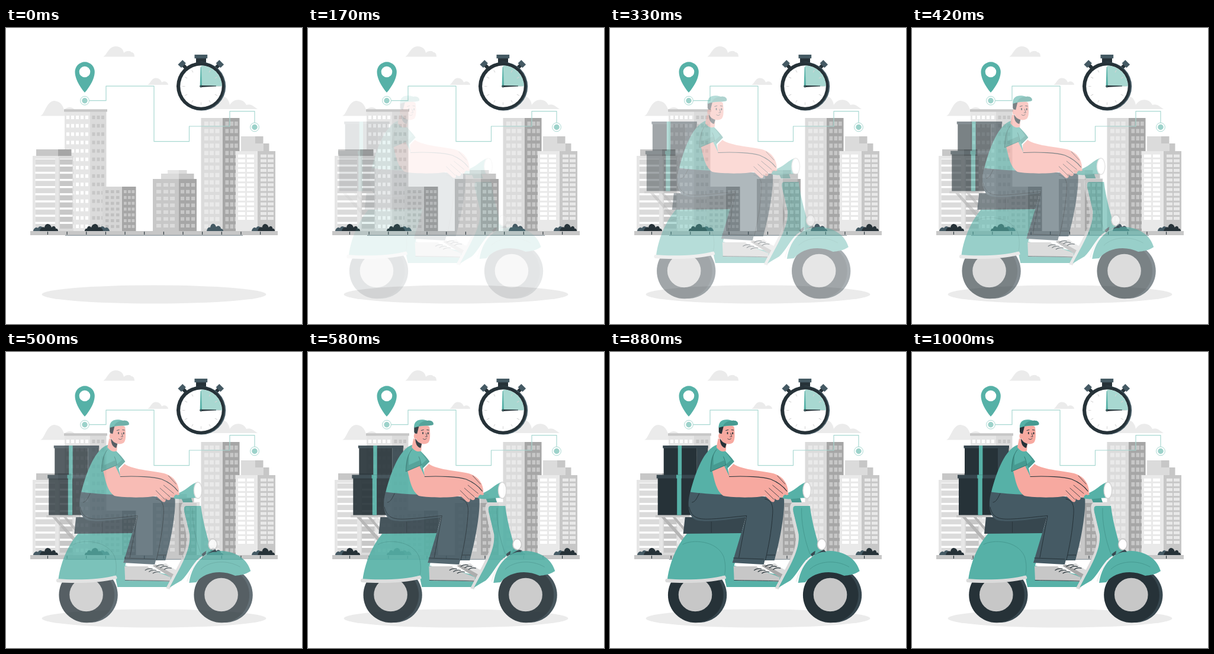
Recreate the animation shown at these times as an HTML page. Size 500x500 px, loop 1.04 s.

```html
<!DOCTYPE html>
<html lang="en">
<head>
<meta charset="utf-8">
<title>Delivery scooter</title>
<style>
html, body { margin: 0; width: 100%; height: 100%; overflow: hidden; background: #fff; }
svg { display: block; width: 100vw; height: 100vh; }
</style>
</head>
<body>
<svg viewBox="0 0 500 500">
  <g id="city"></g>
  <g id="rider"></g>
</svg>
<script>
const TEAL = '#56b1a7', DEEP = '#469a91', PALE = '#a8d8d1', INK = '#263238', SLATE = '#455a64',
      STEEL = '#37474f', SKIN = '#f7a9a0', CLOUD = '#ebebeb';

const rect = (x, y, w, h, fill) => `<rect x="${x}" y="${y}" width="${w}" height="${h}" fill="${fill}"/>`;
const oval = (x, y, rx, ry, fill, extra = '') =>
  `<ellipse cx="${x}" cy="${y}" rx="${rx}" ry="${ry}" fill="${fill}" ${extra}/>`;
const disc = (x, y, r, fill, extra) => oval(x, y, r, r, fill, extra);
const shape = (d, fill) => `<path d="${d}" fill="${fill}"/>`;
const line = (d, color = INK, width = 1) =>
  `<path d="${d}" fill="none" stroke="${color}" stroke-width="${width}" stroke-linecap="round" stroke-linejoin="round"/>`;
const repeat = (n, fn) => Array.from({ length: n }, (_, i) => fn(i)).join('');

// Window grid: columns at xs, n rows starting at y.
const windows = (xs, w, y, step, h, n, fill) =>
  xs.map(x => repeat(n, i => rect(x, +(y + i * step).toFixed(1), w, h, fill))).join('');

function clouds() {
  return shape('M164 48.5C171 46 173 31 185 31C194 31 198 36 199 42C204 38 209 38 212 41C216 41 217 45 217 48.5Z', CLOUD)
    + shape('M239 96C244 94 246 84 253 84.5C259 85 262 88 263 92C267 88 274 91 274 96Z', CLOUD)
    + shape('M58 148.5C66 146 68 123 82 123C92 124 96 131 98 138C106 131 115 134 118 141L126 148.5Z', CLOUD)
    + shape('M338 137C348 133 352 114 363 114.5C373 115 377 123 378 130C384 119 400 118 406 130C414 127 420 134 425 137Z', CLOUD);
}

function buildings() {
  const tower = rect(99, 141, 43, 202, '#e6e6e6') + rect(142, 141, 27.5, 202, '#dbdbdb')
    + rect(98, 137.3, 73, 4.2, '#c7c7c7')
    + windows([102, 110, 118, 126, 134], 5, 148, 14.15, 6, 14, '#fff')
    + windows([145.5, 153.5, 161], 5, 148, 14.15, 6, 14, '#c7c7c7');
  const office = rect(51, 205, 37, 12, '#c7c7c7') + rect(88, 205, 22.5, 12, '#a6a6a6')
    + rect(45, 216, 43.5, 127, '#e6e6e6') + rect(88.5, 216, 25.5, 127, '#dbdbdb')
    + rect(49.5, 221, 33.5, 119, '#fff') + rect(91, 221, 21.5, 119, '#fff')
    + windows([49.5], 33.5, 222, 12.1, 8.7, 10, '#dbdbdb')
    + windows([91], 21.5, 222, 12.1, 8.7, 10, '#c7c7c7');
  const block = rect(163, 268, 33, 75, '#d6d6d6') + rect(196, 268, 23.5, 75, '#a6a6a6')
    + windows([168, 177, 186], 5.5, 274, 9.8, 5, 7, '#c0c0c0')
    + windows([199, 206, 212.5], 4.7, 274, 9.8, 5, 7, '#c7c7c7');
  const stepped = rect(273, 240, 19, 6, '#e6e6e6') + rect(292, 240, 13.5, 6, '#dbdbdb')
    + rect(262, 246, 30, 9, '#dbdbdb') + rect(292, 246, 25.5, 9, '#c7c7c7')
    + rect(248, 255, 44, 88, '#c7c7c7') + rect(292, 255, 30, 88, '#a6a6a6')
    + windows([254, 266, 277], 8, 262, 11.5, 6, 7, '#dbdbdb')
    + windows([295, 304, 313], 6.2, 262, 11.5, 6, 7, '#c7c7c7');
  const high = rect(329.5, 152, 36.5, 191, '#dbdbdb') + rect(366, 152, 28.5, 191, '#a6a6a6')
    + windows([335, 344, 353.5], 7, 158, 12.4, 7.2, 15, '#e9e9e9')
    + windows([370.5, 378.5, 386], 5.7, 158, 12.4, 7.2, 15, '#c7c7c7');
  const right = rect(397, 183, 23.5, 26, '#dbdbdb') + rect(420.5, 183, 14, 26, '#c7c7c7')
    + rect(421, 195, 14, 14, '#dbdbdb') + rect(435, 195, 9.5, 14, '#c7c7c7')
    + rect(388, 208, 37, 135, '#e9e9e9') + rect(425, 208, 30, 135, '#c7c7c7')
    + windows([392, 407], 12, 213.7, 8.1, 5, 14, '#fff')
    + windows([430, 442], 10, 213.7, 8.1, 5, 14, '#e9e9e9');
  return tower + office + block + stepped + high + right;
}

function street() {
  const bush = (x, w, flip) => `<g transform="translate(${flip ? x + w : x} 343) scale(${(flip ? -w : w) / 42} 1)">`
    + shape('M0 0C1 -6 6 -7 8 -5C10 -9 15 -9 17 -4L20 0Z', SLATE)
    + shape('M11 0C12 -6 17 -8 19 -6C20 -14 29 -14 31 -6C34 -10 38 -8 38 -4C41 -5 42 -2 42 0Z', INK) + '</g>';
  return rect(41, 343, 418, 7, '#c7c7c7') + rect(100, 349.8, 300, 0.9, '#687982')
    + bush(46, 42) + bush(133, 42, true) + bush(415, 39)
    + shape('M339 343C340 337 343 336 345 337C346 329 353 329 355 336C359 332 363 336 363 339C366 339 367 341 367 343Z', SLATE)
    + repeat(12, i => rect(69.9 + i * 32.65, 344, 1.1, 5, INK));
}

function route() {
  const stop = (x, y) => disc(x, y, 7.4, '#fff', `stroke="${PALE}"`) + disc(x, y, 4.7, '#9cd2ca');
  return line('M140.5 122.7H169V98.2H250V191.7H309.5V166H378V140.6H420V160', PALE, 1.2)
    + stop(133, 122.7) + stop(420, 167.5)
    + shape('M133 109C130 106 116.5 89 116.5 74A16.6 16.6 0 0 1 149.8 74C149.8 89 136 106 133 109Z', TEAL)
    + disc(133, 74, 9.3, '#fff');
}

function stopwatch() {
  const knob = (x, turn) => `<g transform="translate(${x} 61) rotate(${turn})">`
    + rect(-3, 2, 6, 8, INK) + rect(-5.5, -4.5, 11, 8, SLATE) + '</g>';
  return knob(297.5, -45) + knob(361, 45)
    + rect(321, 50, 17, 10, INK) + rect(318.5, 45, 21.7, 6.3, SLATE)
    + disc(330.2, 98.6, 41, SLATE) + disc(328.6, 98.3, 40.6, INK) + disc(329.5, 98.5, 35.3, '#fff')
    + shape('M329.5 98.5V63.2A35.3 35.3 0 0 1 364.8 98.5Z', PALE)
    + repeat(12, i => `<path d="M329.5 67V71.5" stroke="#d5d5d5" transform="rotate(${i * 30} 329.5 98.5)"/>`)
    + shape('M328.6 66H329.8L331 99H327.6Z', TEAL) + shape('M328 97L355 97.6V98.6L328 100Z', INK)
    + disc(329.3, 98.4, 2, INK) + disc(329.3, 98.4, 0.8, TEAL);
}

function wheel(x) {
  return oval(x + 5.5, 410.5, 47, 46.5, STEEL) + disc(x, 410.5, 46.8, INK) + disc(x - 0.7, 410, 28.3, '#c7c7c7');
}

function cargo() {
  return shape('M84 278H90L129 320H121Z M103 278H108L128 301V308Z', '#b5b5b5')
    + rect(75, 275.5, 58, 3.8, '#c7c7c7')
    + rect(89, 160, 56, 48, INK) + rect(145, 160, 18.5, 48, STEEL)
    + rect(87.5, 158, 76.5, 4.5, STEEL) + rect(113, 158, 6.4, 50, TEAL)
    + rect(79, 211, 80, 64.5, INK) + rect(77, 207.5, 82, 6, STEEL) + rect(111.5, 213, 7.3, 62.5, TEAL)
    + rect(110.3, 207.5, 9, 6, TEAL);
}

function scooter() {
  const rear = shape('M129 306C116 321 100 348 95 385C132 387 164 386 191 378L195 397H282L290 378L208 361L224 300Z', TEAL)
    + line('M121 325C137 316 178 318 190 345C193 354 194 365 192 376', DEEP)
    + shape('M93 383C126 386 168 384 192 377.5Q195 380 194 383C164 391 122 391 93 389Q90 386 93 383Z', '#dbdbdb')
    + shape('M125 279H228L220 306L122 307Z', STEEL) + line('M169.5 287V305', INK, 0.8);
  const fender = shape('M316 390C322 352 346 336 370 336C398 337 415 352 420 370C411 376 402 377 394 378C372 367 342 371 328 389Z', TEAL)
    + line('M336 367C350 353 380 350 402 363', DEEP);
  const shield = shape('M334 253.5V260H312Q307 261 308 270L317 306C320 335 306 358 283 401L277 399C298 359 314 336 312 312L303 270C301 260 303 254 309 253.5Z', '#dbdbdb')
    + shape('M311 260H336C339 285 345 305 349 320V340L333 348C322 358 314 376 303 386Q294 391 283 398C304 358 319 334 317 308L308 270Q306 260 311 260Z', TEAL)
    + line('M322 264C321 285 326 315 336 341', DEEP) + line('M338 346C326 355 318 369 313 387', '#f0f0f0', 2.2)
    + shape('M337 342C345 334 352 333 360 334L363 338C354 337 346 339 340 345Z', STEEL)
    + shape('M344 342C346 328 351 320 356 319L359 334Z', TEAL)
    + oval(356, 325, 7.3, 9.3, '#fff', 'stroke="#c7c7c7" stroke-width="1.5"');
  const bars = shape('M302 245H319L322 254H306Z', DEEP)
    + shape('M286 241C308 239 316 224 330 219.5V247C318 245 303 251 290 247Z', TEAL)
    + oval(331, 233.7, 6.8, 13.7, '#fff', 'stroke="#d5d5d5" stroke-width="1.5"');
  return { rear, fender, front: shield + bars };
}

function legs() {
  const laces = (x, y) => repeat(3, i => line(`M${x + i * 6.5} ${y + i * 2.6}q5 -4 12 -2`, INK, 1.3));
  const shoes = shape('M256 361L277 357C285 366 300 368 301 376L290 384Z', '#dbdbdb')
    + shape('M254 361L260 359L296 379L289 383Z', '#a6a6a6') + laces(261, 362)
    + shape('M207 362H246C255 373 274 374 285 381L284 388C260 386 225 387 208 386Z', '#c7c7c7')
    + line('M208 385.5C230 386 262 386 283 387', INK, 0.9) + laces(242, 368.5);
  const far = shape('M240 243L292 246C294 262 289 305 276 352H259L258 270Z', SLATE);
  const near = shape('M134 236C129 252 129 276 142 283C154 289 194 284 228 279L205 356L258 359C265 330 274 302 275 266C274 248 258 245 190 238Z', SLATE)
    + line('M149 239C144 249 142 253 137 254M132 262C136 282 150 283 170 282C190 281 212 278 229 276.5L216 347', INK)
    + line('M260 248C271 251 274 258 273 273C271 304 266 328 261 351M207 348L258 350M263 343H277', INK);
  return shoes + far + near;
}

function torso() {
  const farArm = shape('M207 189C222 200 262 201 277 206C291 211 299 223 299 237L291 243L268 220L198 213L199 197Z', SKIN);
  const shirt = shape('M178 157L192 166C197 172 203 178 208 185L197 196L200 211L190 241C170 240 150 238.5 134 236.5C143 201 158 164 178 157Z', TEAL)
    + shape('M193 168C199 173 204 179 208 185L197 196L194 190L203 182Z', DEEP);
  const nearArm = shape('M171 201L191 192L200 210.5C226 209 259 211 270 215C286 222 295 232 300 240C297 244 293 240 289 238C294 245 289 249 284 243C287 250 281 253 276 247C278 254 273 256 268 250L260 243C250 246 211 247 190 243C178 235 175 218 171 201Z', SKIN)
    + line('M200 210.5C226 209 258 211 270 215C282 220 291 227 297 235', INK, 1.2)
    + line('M273 225L290 239M267 230L284 245M260 234L275 249', INK, 0.8)
    + line('M281 209L294 223', INK, 0.8);
  const sleeve = shape('M181 163C172 171 169 185 168 202L194 191C193 182 189 170 181 163Z', TEAL)
    + shape('M173 172C168 181 168 191 168 202L194 191L191 183L173 191Z', DEEP)
    + line('M178 165C171 173 169 187 168 202L194 191C193 186 192 181 190 177', '#2f6e68', 0.8);
  return farArm + shirt + nearArm + sleeve;
}

function head() {
  return shape('M181 146L178 161C184 169 190 169 194 167L195 153Z', SKIN)
    + shape('M185 125C195 121 205 123 208 127C209 137 210 148 206 153C201 157 192 156 186 150Z', SKIN)
    + shape('M182 126H190L187 138L184 139L182 135Z', INK)
    + shape('M184 145C186 151 191 154 195 155L193 162C187 161 184 155 184 145Z', INK)
    + oval(184.3, 142, 2.8, 4.5, SKIN)
    + shape('M182 128C181 117 189 113 199 114.5L205 116C211 115 216 119 214 123C205 126 195 123 182 128Z', TEAL)
    + shape('M189 126C191 119 198 116 205 116C211 115 216 119 214 123C205 126 198 122 189 126Z', DEEP)
    + oval(196.8, 137, 1, 2, INK) + oval(205.5, 137.2, 1, 2, INK)
    + line('M194 132.5L198 131.5M203.5 131.5L207 132', INK, 1)
    + line('M202 137L204 143H201M197 146.5Q200 149.5 203 146', INK, 0.8);
}

function scooterRider() {
  const { rear, fender, front } = scooter();
  return cargo() + wheel(143) + wheel(371) + rear + legs() + fender + front + torso() + head();
}

const rider = document.getElementById('rider');
document.getElementById('city').innerHTML =
  oval(250, 450, 189.5, 15.5, CLOUD) + clouds() + buildings() + street() + route() + stopwatch();
rider.innerHTML = scooterRider();

const LOOP = 1040, FPS = 24, SLIDE = 30;

// cubic-bezier(.36, -.01, .5, 1.38), solved by bisection
function ease(x) {
  const curve = (u, a, b) => 3 * (1 - u) ** 2 * u * a + 3 * (1 - u) * u * u * b + u ** 3;
  let low = 0, high = 1;
  for (let i = 0; i < 24; i++) {
    const mid = (low + high) / 2;
    if (curve(mid, 0.36, 0.5) < x) low = mid; else high = mid;
  }
  return curve(high, -0.01, 1.38);
}

function render(time) {
  const t = time % LOOP;
  // Steps fall on 24 fps times rounded to 10 ms.
  let step = FPS;
  while (Math.round(step * 100 / FPS) * 10 > t) step--;
  const progress = step < 3 ? 0 : ease(Math.min(1, (step + 0.4) / FPS));
  rider.setAttribute('transform', `translate(${(SLIDE * (progress - 1)).toFixed(2)} 0)`);
  rider.setAttribute('opacity', Math.min(1, progress).toFixed(3));
}

const start = performance.now();
function tick() {
  render(performance.now() - start);
  requestAnimationFrame(tick);
}
tick();
</script>
</body>
</html>
```
